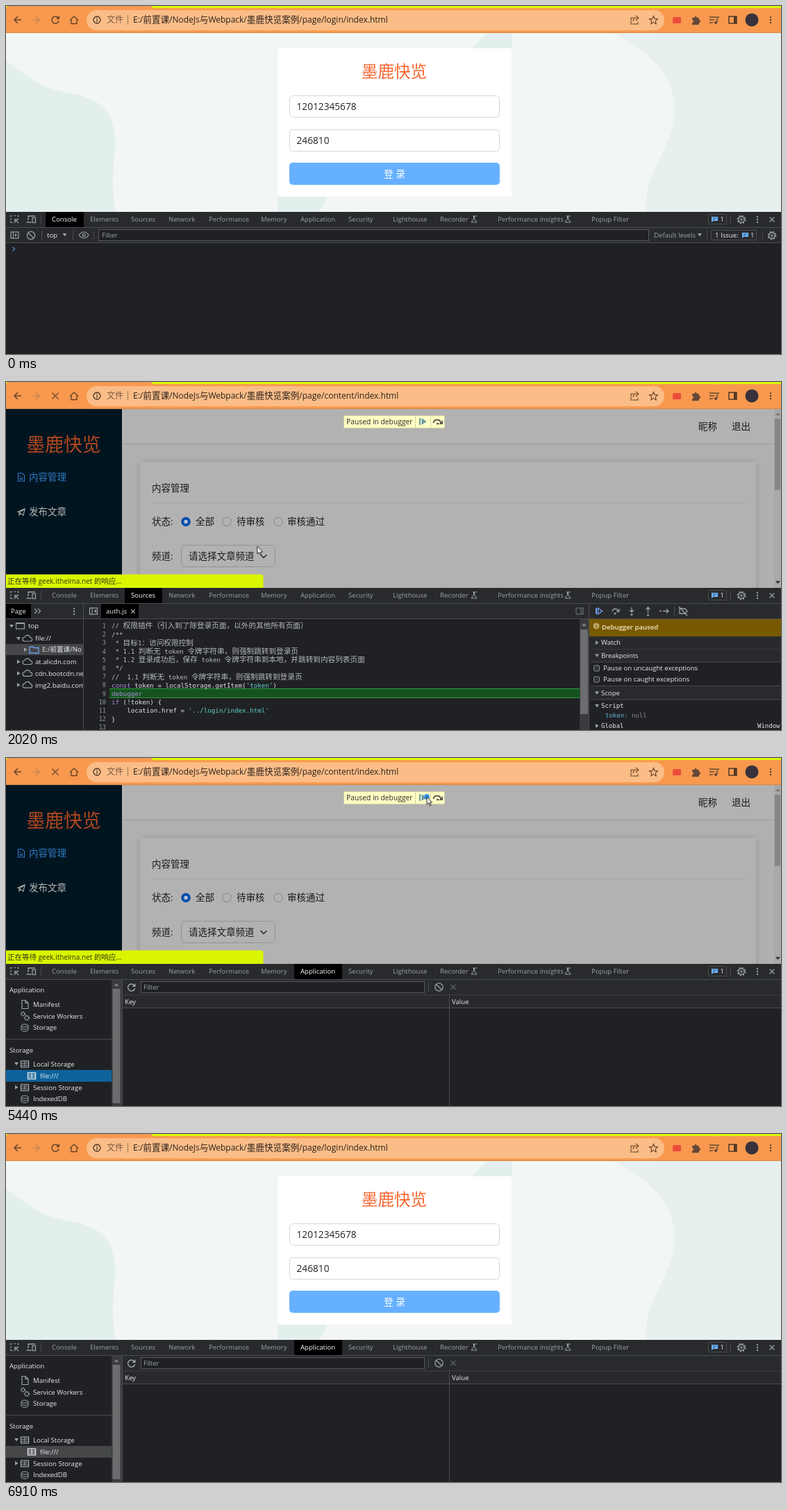
These frames come from a looping animation (1116 px wide and 502 px high, 7400 ms). An HTML page:

```html
<!DOCTYPE html>
<html lang="zh">
<head>
<meta charset="utf-8">
<title>Login flow</title>
<style>
html, body { margin: 0; width: 100%; height: 100%; overflow: hidden; background: #202124; }
svg { display: block; width: 100vw; height: 100vh; }
text { font-family: "Open Sans", "Noto Sans CJK SC", "Noto Sans CJK", sans-serif; white-space: pre; }
.mono { font-family: "DejaVu Sans Mono", "Noto Sans CJK SC", "Noto Sans CJK", monospace; }
</style>
</head>
<body>
<svg id="stage" viewBox="0 0 1116 502"></svg>
<script>
const LOOP = 7400, STEP = 76.78, LAST = 90;
const BRAND = '墨鹿快览', GREY = '#9aa0a6', LIGHT = '#e8eaed', LINE = '#494c50';

const rect = (x, y, w, h, fill, more = '') =>
  `<rect x="${x}" y="${y}" width="${w}" height="${h}" fill="${fill}" ${more}/>`;
const circle = (x, y, r, fill, more = '') =>
  `<circle cx="${x}" cy="${y}" r="${r}" fill="${fill}" ${more}/>`;
const line = (d, stroke, width = 1, more = '') =>
  `<path d="${d}" fill="none" stroke="${stroke}" stroke-width="${width}" ${more}/>`;
const shape = (d, fill, more = '') => `<path d="${d}" fill="${fill}" ${more}/>`;
const group = (id, ...parts) => `<g id="${id}">${parts.join('')}</g>`;
const at = (x, y, body) => `<g transform="translate(${x} ${y})">${body}</g>`;
// y is the middle of the line; cjk is the size of Chinese runs
const text = (x, y, str, size, fill, cjk = size, more = '') => {
  const body = str.replace(/[\u3000-\u9fff\uff00-\uffef]+/g, s => `<tspan font-size="${cjk}">${s}</tspan>`);
  return `<text x="${x}" y="${y + size * 0.36}" font-size="${size}" fill="${fill}" ${more}>${body}</text>`;
};
const label = (x, y, str, fill = LIGHT, size = 9.6) => text(x, y, str, size, fill);

const gear = (x, y) => circle(x, y, 4.2, 'none', `stroke="${GREY}" stroke-width="1.4"`) +
  circle(x, y, 5.6, 'none', `stroke="${GREY}" stroke-width="1.6" stroke-dasharray="2.2 2.2"`) + circle(x, y, 1.6, GREY);
const dots = (x, y, fill = GREY) => [-4, 0, 4].map(d => circle(x, y + d, 1.2, fill)).join('');
const cross = (x, y, r, stroke) => line(`M${x - r} ${y - r}l${2 * r} ${2 * r}m0 ${-2 * r}l${-2 * r} ${2 * r}`, stroke, 1.3);
const ban = (x, y) => circle(x, y, 5.6, 'none', `stroke="${GREY}" stroke-width="1.3"`) + line(`M${x - 4} ${y - 4}l8 8`, GREY, 1.3);
const flask = x => line(`M${x - 3} 303h6m-4.5 0v4l-3.5 5h8l-3.5-5v-4`, GREY);
const arrow = (x, y, open) => shape(open ? `M${x - 3} ${y - 2}h6l-3 4.5z` : `M${x - 2} ${y - 3}v6l4.5-3z`, GREY);
const reload = (x, y, stroke, r = 5) => line(`M${x + r - 1} ${y - 3}A${r} ${r} 0 1 0 ${x + r} ${y + 1}`, stroke, 1.5) +
  shape(`M${x + r + 1} ${y - 6}v5h-5z`, stroke);
const chat = (x, y) => shape(`M${x} ${y}h9v6h-6.5l-2.5 2z`, '#6cb0f5') + line(`M${x + 2} ${y + 2}h5m-5 2h3`, '#24476c', .8);
const grid = (x, y, stroke) => rect(x - 5.5, y - 4.5, 11, 9, 'none', `stroke="${stroke}" stroke-width="1.3"`) +
  line(`M${x - 5} ${y - 1.3}h10m-10 3h10m-5-6v7.5`, stroke);
const drum = (x, y) => line(`M${x - 5} ${y - 3}v6c0 3 10 3 10 0v-6m-10 3c0 3 10 3 10 0`, GREY) +
  `<ellipse cx="${x}" cy="${y - 3}" rx="5" ry="2" fill="none" stroke="${GREY}"/>`;
const cloud = (x, y) => line(`M${x - 4} ${y + 4}h8a2.7 2.7 0 0 0 0-5.4a4.2 4.2 0 0 0-8-.6a3 3 0 0 0 0 6z`, GREY, 1.2);

function browserBar() {
  const ink = '#6b4528';
  return rect(0, 0, 1116, 39, '#f8994f') +
    shape('M210 0H1116V3H214Q210 3 209 0z', '#daf500') + rect(0, 0, 2, 2, '#daf500') +
    rect(0, 38, 1116, 1, '#d98645') + rect(116, 6, 832, 29, '#fbbd88', 'rx="14.5"') +
    line('M22 20H12m5-5l-5 5l5 5', ink, 1.5) + line('M38 20h10m-5-5l5 5l-5 5', '#cf864e', 1.5) +
    group('reload', reload(71, 20, ink)) + group('stop', cross(71, 20, 4.5, ink)) +
    line('M92 20.5l6-5.5l6 5.5m-10-1v6h8v-6', ink, 1.4) +
    circle(131, 20, 5, 'none', 'stroke="#4b3424" stroke-width="1.3"') + rect(130.4, 19, 1.3, 4, '#4b3424') + rect(130.4, 16.6, 1.3, 1.4, '#4b3424') +
    text(145, 20, '文件', 12, '#7a5940') + rect(175, 13, 1, 14, '#a1734f') +
    text(183, 20, '', 12, '#2b211a', 12.6, 'id="url"') +
    line('M905 17h-5v9h10v-3m-7-1c0-4 3-5 6-5m-2-3l4 3l-4 4', ink, 1.1) +
    shape('M932.500 14.500l1.700 3.900 4.200.4-3.200 2.800 1 4.200-3.700-2.200-3.700 2.200 1-4.200-3.200-2.800 4.200-.4z', 'none', `stroke="${ink}" stroke-width="1.2"`) +
    rect(960, 16, 12, 9, '#ee4b3c', 'rx="1.500"') +
    shape('M988 17h3a2 2 0 0 1 4 0h3v3a2 2 0 0 1 0 4v3h-10v-3a2 2 0 0 0 0-4z', '#644936') +
    line('M1013 16h10m-10 4h7m-7 4h5m6-8v8m0-8h3', '#644936', 1.4) + circle(1022, 24, 2, '#644936') +
    rect(1041, 15, 11, 10, 'none', 'stroke="#4d3828" stroke-width="1.5"') + rect(1048, 15, 4, 10, '#4d3828') +
    circle(1074, 20, 9.5, '#39323b') + dots(1101, 20, '#5b4029');
}

function loginPage() {
  const mint = '#e3efec';
  const field = (y, str) => rect(408.5, y, 302, 31, '#fff', 'rx="5" stroke="#d3d7db"') + text(418.5, y + 15.500, str, 13.7, '#212529');
  return rect(0, 39, 1116, 258, '#fff') +
    group('blobs',
      rect(0, 39, 1116, 258, '#f2f6f5'),
      shape('M0 79C30 101 52 120 92 126C138 133 155 155 157 190C158 222 149 252 158 297H0z', mint),
      shape('M874 39C938 71 968 112 962 160C953 218 915 245 923 297H1116V39z', '#e7f0ee'),
      shape('M672 61Q681 47 695 39H728V61z', mint),
      shape('M391 275H461Q459 288 450 297H391z', mint)) +
    rect(391, 61, 337, 214, '#fff') +
    text(559, 95, BRAND, 23.6, '#f9652f', 23.6, 'text-anchor="middle"') +
    field(129.500, '12012345678') + field(178.500, '246810') +
    rect(408, 226, 303, 32, '#66b1ff', 'rx="5"') + text(559.5, 242, '登 录', 13.7, '#fff', 13.7, 'text-anchor="middle"') +
    group('alert', rect(391.5, 82, 336, 47.500, '#d0e7dd', 'rx="5" stroke="#b8d8c9"'), text(405, 105, '登录成功', 13.500, '#284f3f'));
}

function contentPage() {
  const ink = '#171a1d', item = (x, y, str, fill = ink) => text(x, y, str, 13.5, fill);
  const radio = x => circle(x, 201.500, 6.300, '#b3b3b3', 'stroke="#868686"');
  return rect(0, 39, 1116, 258, '#b0b0b0') + rect(167, 39, 939, 50, '#b2b2b2') + rect(167, 89, 939, 1, '#989a9b') +
    rect(193, 115, 887, 190, '#b2b2b2', 'rx="4" filter="url(#soft)"') +
    rect(0, 39, 167, 258, '#001520') + text(83, 90, BRAND, 26.8, '#b5481f', 26.8, 'text-anchor="middle"') +
    line('M17.500 131.500h6l3 3v8.500h-9zm2 4h2m-2 3h5m-5 2h5', '#2f78c4', 1.1) + item(33, 137, '内容管理', '#2f78c4') +
    line('M17 187l10-4l-2 9l-4-2.500l-2 2.500v-3.500zm2 1.500l8-5.500', '#b2b2b2', 1.1) + item(33, 187, '发布文章', '#b8b8b8') +
    item(997, 64, '昵称') + item(1045, 64, '退出') +
    item(210, 153, '内容管理') + rect(210, 174, 854, 1, '#a5a5a5') +
    item(210, 201, '状态:') + circle(259, 201.500, 6.800, '#0a4db0') + circle(259, 201.500, 2.700, '#b9c4d4') + item(273, 201, '全部') +
    radio(318) + item(332, 201, '待审核') + radio(392) + item(405, 201, '审核通过') +
    item(210, 251, '频道:') + rect(252.500, 235.500, 135, 31, '#b2b2b2', 'rx="5" stroke="#909498"') +
    item(263, 251, '请选择文章频道') + line('M366.500 249l4.500 4.500l4.500-4.500', '#24282c', 1.5) +
    rect(1106, 39, 10, 258, '#a9a9a9') + rect(1107, 53, 8, 103, '#868686') +
    shape('M1108 48h7l-3.500-4z', '#777') + shape('M1108 287h7l-3.500 4z', '#333') +
    rect(486.500, 48.500, 145, 18, '#ffffc4', 'stroke="#cfcfa8"') + text(490, 57, 'Paused in debugger', 10.3, '#2a2a2a') +
    rect(589, 49, 1, 17, '#d0d0aa') + rect(611, 49, 1, 17, '#d0d0aa') +
    rect(595, 52, 2, 10, '#6b9aa9') + shape('M598.500 52l7 5l-7 5z', '#6b9aa9') +
    line('M615.500 59c1-6 9-6 11 0', '#5e5e58', 2) + shape('M629 55v6h-6z', '#5e5e58') + circle(621.500, 60, 1.600, '#5e5e58');
}

const TABS = [['Console', 66], ['Elements', 121], ['Sources', 180], ['Network', 234], ['Performance', 292],
  ['Memory', 367], ['Application', 424], ['Security', 493], ['Lighthouse', 557], ['Recorder', 625],
  ['Performance insights', 708], ['Popup Filter', 843]];

function tabBar() {
  return rect(0, 297, 1116, 205, '#202124') + rect(0, 297, 1116, 23, '#292a2d') + rect(0, 319, 1116, 1, LINE) +
    rect(415, 297, 69, 22, '#3b3c3f', 'id="hover"') + rect(57, 297, 55, 22, '#000', 'id="picked"') +
    line('M9 302.500H7v2m0 2v2m0 2v2h2m2 0h1m0-10h2m2 0h1.500v2m0 2v1', GREY, 1.2) + line('M18 313l-5-5m0 4.500v-4.500h4.500', GREY, 1.4) +
    line('M32 309v-6h10m-12.500 9h7', GREY, 1.300) + rect(38, 305.500, 4.500, 7, 'none', `stroke="${GREY}" stroke-width="1.200"`) + rect(50, 301, 1, 13, LINE) +
    TABS.map(([name, x]) => text(x, 308, name, 9.6, GREY, 9.6, 'class="tab"')).join('') + flask(675) + flask(810) +
    group('badge', rect(1011.500, 300.500, 26, 14, 'none', `stroke="${LINE}" rx="1"`), chat(1016, 304), label(1028.500, 307.500, '1')) +
    rect(1043, 301, 1, 13, LINE) + gear(1059, 308) + dots(1082, 308) + cross(1103, 308, 3.500, GREY);
}

function consolePanel() {
  return rect(0, 320, 1116, 22, '#292a2d') + rect(0, 341, 1116, 1, LINE) +
    rect(7, 326, 11, 9, 'none', `stroke="${GREY}" stroke-width="1.2"`) + line('M10.500 326v9', GREY) + shape('M13 328v5l3-2.500z', GREY) +
    ban(36, 331) + rect(51, 324, 1, 13, LINE) + label(59, 331, 'top') + arrow(84.500, 330, true) + rect(96, 324, 1, 13, LINE) +
    line('M105 330.500c4-6 10-6 14 0c-4 6-10 6-14 0z', GREY, 1.2) + circle(112, 330.500, 2, 'none', `stroke="${GREY}" stroke-width="1.200"`) + rect(126, 324, 1, 13, LINE) +
    rect(133.500, 322.500, 792, 16, '#202124', 'stroke="#55585c"') + label(138, 331, 'Filter', GREY) +
    label(933, 331, 'Default levels', GREY) + arrow(999, 330, true) + rect(1009, 324, 1, 13, LINE) +
    rect(1015.500, 323.500, 65, 14, 'none', `stroke="${LINE}" rx="1"`) + label(1021, 331, '1 Issue:') + chat(1060, 327) + label(1072, 331, '1') +
    rect(1089, 324, 1, 13, LINE) + gear(1103, 331) + line('M9.500 347.500l3 3l-3 3', '#4a87d8', 1.300);
}

const CODE = [
  '// 权限插件（引入到了除登录页面，以外的其他所有页面）', '/**', ' * 目标1：访问权限控制',
  ' * 1.1 判断无 token 令牌字符串，则强制跳转到登录页',
  ' * 1.2 登录成功后，保存 token 令牌字符串到本地，并跳转到内容列表页面', ' */',
  '//  1.1 判断无 token 令牌字符串，则强制跳转到登录页',
  "const token = localStorage.getItem('token')", 'debugger', 'if (!token) {',
  "    location.href = '../login/index.html'", '}', ''];

function codeLine(str, i) {
  const y = 352 + i * 12.2, comment = i < 7;
  const body = comment ? str : str.replace(/'.*?'/g, s => `<tspan fill="#5fd3c8">${s}</tspan>`)
    .replace(/^(const|if|debugger)/, '<tspan fill="#a88fdc">$1</tspan>');
  return text(144, y, String(i + 1), 8.6, '#8f959b', 8.6, 'text-anchor="end" class="mono"') +
    text(152, y, body, 9.2, comment ? '#b6babf' : '#dfe3e6', 10.65, 'class="mono"');
}

function sourcesPanel() {
  const tree = (x, y, str, open) => arrow(x, y, open) + label(x + 24, y, str);
  const head = (y, str, open) => rect(841, y - 9, 275, 18, '#292a2d') + rect(841, y + 9, 275, 1, LINE) + arrow(851, y, open) + label(857, y, str);
  const check = (y, str) => rect(846.500, y - 4, 8, 8, '#33353a', 'rx="1.500" stroke="#85898e"') + label(860, y, str);
  return rect(0, 320, 1116, 22, '#292a2d') + rect(0, 320, 36, 21, '#000') + label(7, 331, 'Page') +
    line('M41 327l3.500 3.500l-3.500 3.500m5-7l3.500 3.500l-3.500 3.500', GREY, 1.2) + dots(98, 331) +
    arrow(8, 352, true) + rect(14.500, 348, 12, 8, 'none', `stroke="${GREY}" stroke-width="1.2"`) + rect(14, 347, 13, 2, GREY) + label(32, 352, 'top') +
    tree(18, 370, 'file://', true) + cloud(31, 370) + rect(0, 378, 111, 16, '#454749') +
    arrow(28, 386, false) + shape('M34 382h5l1.500 1.500h6.500v7.500h-13z', 'none', 'stroke="#6ea2ef" stroke-width="1.3"') + label(52, 386, 'E:/前置课/No') +
    ['at.alicdn.com', 'cdn.bootcdn.ne', 'img2.baidu.com'].map((s, i) => tree(18, 403.500 + i * 16.800, s) + cloud(31, 403.500 + i * 16.800)).join('') +
    rect(111, 342, 729, 160, '#202124') + rect(111, 320, 1, 182, LINE) + rect(112, 320, 728, 22, '#292a2d') +
    rect(120.500, 326, 11, 9, 'none', `stroke="${GREY}" stroke-width="1.2"`) + line('M124 326v9', GREY) + shape('M130 328v5l-3.500-2.500z', GREY) +
    rect(137, 320, 54, 21, '#000') + label(144, 331, 'auth.js') + cross(183, 331, 2.700, GREY) + line('M821 326h10v9h-10zm7 0v9', '#777b80') +
    rect(0, 341, 1116, 1, LINE) + rect(149, 442, 677, 13, '#16521f') + rect(149, 442, 677, 1, '#2e9b3f') + rect(149, 455, 677, 1, '#2e9b3f') +
    rect(151, 443, 45, 12, '#5d7368', 'id="token"') + CODE.map(codeLine).join('') +
    rect(826, 342, 13, 160, '#3a3b3e') + rect(827, 357, 11, 122, '#6c6d6f') + shape('M829 352h7l-3.500-4z', '#808286') +
    rect(840, 320, 276, 182, '#202124') + rect(839, 320, 1, 182, LINE) + rect(840, 320, 276, 22, '#292a2d') + rect(840, 341, 276, 1, LINE) +
    line('M850 326v9', '#6ea2ef', 2) + shape('M852.500 326l6 4.500l-6 4.500z', 'none', 'stroke="#6ea2ef" stroke-width="1.300"') +
    line('M873 331c1-5 7-5 9 0m1-4v4h-4', GREY, 1.300) + circle(877, 334, 1.500, GREY) +
    line('M901 325v7m-3-3l3 3l3-3M924.500 333v-8m-3 3l3-3l3 3M941 330.500h3m2 0h8m-3-3l3 3l-3 3M970 327h8l3 3.500l-3 3.500h-8zm-1-3l12 13', GREY, 1.300) +
    circle(901, 335.500, 1.500, GREY) + circle(924.500, 336, 1.500, GREY) + rect(962, 324, 1, 13, LINE) +
    rect(840, 342, 276, 25, '#785900') + circle(850, 352, 4.500, '#bda765') + rect(849.400, 351, 1.300, 3.500, '#785900') +
    text(858, 354, 'Debugger paused', 9.6, '#f4e8c5', 9.6, 'font-weight="600"') +
    head(376, 'Watch') + head(394.500, 'Breakpoints', true) + check(413, 'Pause on uncaught exceptions') + check(429, 'Pause on caught exceptions') +
    rect(841, 438, 275, 1, LINE) + head(448.500, 'Scope', true) + arrow(851, 467, true) + text(857, 467, 'Script', 9, LIGHT, 9, 'class="mono"') +
    text(863, 481, 'token: <tspan fill="#85898e">null</tspan>', 9, '#5db0d7', 9, 'class="mono"') +
    arrow(851, 496, false) + text(857, 496, 'Global', 9, LIGHT, 9, 'class="mono"') + text(1082, 496, 'Window', 9, LIGHT, 9, 'class="mono"');
}

function applicationPanel() {
  return label(5, 335, 'Application') + line('M23 349.500h5l4 4v8h-9zm5 0v4h4', GREY, 1.200) + label(39, 356, 'Manifest') +
    circle(24.500, 369, 2.500, 'none', `stroke="${GREY}" stroke-width="2" stroke-dasharray="1.800 1"`) +
    circle(30, 375, 3, 'none', `stroke="${GREY}" stroke-width="2" stroke-dasharray="1.800 1"`) +
    label(39, 372.500, 'Service Workers') + drum(27, 389) + label(39, 389, 'Storage') + rect(0, 405, 152, 1, LINE) +
    label(5, 421.500, 'Storage') + arrow(15, 441, true) + grid(27, 441.500, GREY) + label(39, 441.500, 'Local Storage') +
    rect(0, 450, 152, 17, '#0e639c', 'id="row"') + grid(37, 458.500, LIGHT) + label(49, 458.500, 'file:///') +
    arrow(15, 475, false) + grid(27, 475.500, GREY) + label(39, 475.500, 'Session Storage') + drum(27, 492) + label(39, 492, 'IndexedDB') +
    rect(152, 320, 15, 182, '#3a3b3e') + rect(153.500, 333, 11, 165, '#6c6d6f') + shape('M155.500 329h7l-3.500-4z', '#808286') +
    rect(167, 320, 949, 22, '#292a2d') + rect(167, 341.500, 949, 1, LINE) + rect(167, 320, 1, 182, LINE) + reload(180.500, 331, GREY, 5) +
    rect(194.500, 322.500, 408, 16, '#202124', 'stroke="#55585c"') + label(198, 331, 'Filter', GREY) + rect(608, 324, 1, 13, LINE) +
    ban(623.500, 330.500) + cross(644, 330.500, 3.500, '#5f6368') +
    rect(168, 342.500, 948, 17.500, '#292a2d') + rect(168, 360, 948, 1, LINE) + rect(638, 342, 1, 160, LINE) + label(171, 351.500, 'Key') + label(642, 351.500, 'Value');
}

const statusBar = () => shape('M0 277.500H367Q370.500 277.500 370.500 281V297H0z', '#daf500') +
  text(2, 287.500, '正在等待 geek.itheima.net 的响应...', 10, '#33380d', 10.5);

const stage = document.getElementById('stage');
stage.innerHTML =
  '<filter id="soft" x="-5%" y="-20%" width="110%" height="140%"><feDropShadow dx="0" dy="1" stdDeviation="4" flood-opacity=".18"/></filter>' +
  group('login', loginPage()) + group('content', contentPage()) + group('status', statusBar()) + browserBar() + tabBar() +
  group('console', consolePanel()) + group('sources', sourcesPanel()) + group('application', applicationPanel()) +
  circle(0, 0, 0, 'none', 'id="ring"') +
  group('cursor', shape('M0 0V11L2.600 8.700L4.300 12.700L5.900 12L4.200 8.200H7.600Z', '#fff', 'stroke="#111" stroke-width=".9"'));

const node = Object.fromEntries([...stage.querySelectorAll('[id]')].map(n => [n.id, n]));
const tabs = [...stage.querySelectorAll('.tab')];
const urlRun = page => `E:/前置课/NodeJs与Webpack/${BRAND}案例/page/${page}/index.html`
  .replace(/[\u4e00-\u9fff]+/g, s => `<tspan font-size="12.6">${s}</tspan>`);
const urls = { login: urlRun('login'), content: urlRun('content') };
let shownUrl = '';

// time, x, y
const TRACK = [[70, 620, 500], [380, 440, 243], [540, 440, 243], [800, 450, 374], [920, 450, 374], [1230, 417, 269],
  [1460, 284, 166], [1620, 284, 166], [2330, 431, 300], [2410, 431, 300], [2570, 175, 433], [2680, 175, 433],
  [2870, 433, 310], [3330, 433, 310], [3730, 440, 335], [4030, 612, 335], [4300, 177, 390], [4440, 177, 390],
  [4530, 205, 390], [5290, 600, 61], [5370, 606, 56], [5850, 606, 56], [6080, 504, 163], [6380, 342, 240],
  [6500, 342, 240], [6850, 980, 412]];
const CLICKS = [[380, 440, 243], [3090, 433, 310], [5370, 606, 56]];

function cursorAt(t) {
  const i = TRACK.findIndex(k => k[0] > t);
  if (i < 1) return null;
  const [t0, x0, y0] = TRACK[i - 1], [t1, x1, y1] = TRACK[i], p = (t - t0) / (t1 - t0);
  return [x0 + (x1 - x0) * p, y0 + (y1 - y0) * p];
}

function render(time) {
  const t = Math.min(LAST, Math.floor((time % LOOP + 5) / STEP)) * STEP;
  const within = (a, b) => t >= a && t < b;
  const show = (id, on) => node[id].style.display = on ? '' : 'none';
  const loading = within(1140, 5980);
  const panel = t < 1680 ? 'console' : t < 3290 ? 'sources' : 'application';
  const onContent = within(1370, 5500);

  show('login', !onContent);
  show('content', onContent);
  show('blobs', t < 5500 || t >= 5980);
  show('alert', within(910, 1370));
  show('status', within(1140, 6200));
  show('reload', !loading);
  show('stop', loading);
  show('badge', !within(1370, 1680));
  show('token', t >= 2560);
  show('hover', within(2860, 3290));
  ['console', 'sources', 'application'].forEach(id => show(id, id === panel));
  node.row.setAttribute('fill', t < 5400 ? '#0e639c' : '#454749');

  const url = urls[within(1140, 5500) ? 'content' : 'login'];
  if (url !== shownUrl) node.url.innerHTML = shownUrl = url;

  const picked = { console: 0, sources: 2, application: 6 }[panel];
  node.picked.setAttribute('x', TABS[picked][1] - 9);
  node.picked.setAttribute('width', [55, , 54, , , , 69][picked]);
  tabs.forEach((tab, i) => tab.setAttribute('fill', i === picked || i === 6 && within(2860, 3290) ? '#fff' : GREY));

  const click = CLICKS.find(c => within(c[0], c[0] + 480));
  show('ring', click);
  if (click) {
    const p = (t - click[0]) / 400, q = Math.min(1, p);
    const attrs = { cx: click[1], cy: click[2], r: 2 + 12.5 * q, fill: 'none', stroke: '#2f8fdc', 'stroke-width': 3.5 - q, opacity: 1 - .68 * q };
    for (const key in attrs) node.ring.setAttribute(key, attrs[key]);
  }

  const pos = cursorAt(t);
  show('cursor', pos);
  if (pos) node.cursor.setAttribute('transform', `translate(${pos[0].toFixed(1)} ${pos[1].toFixed(1)})`);
}

const start = performance.now();
function tick() {
  render(performance.now() - start);
  requestAnimationFrame(tick);
}
tick();
</script>
</body>
</html>
```
